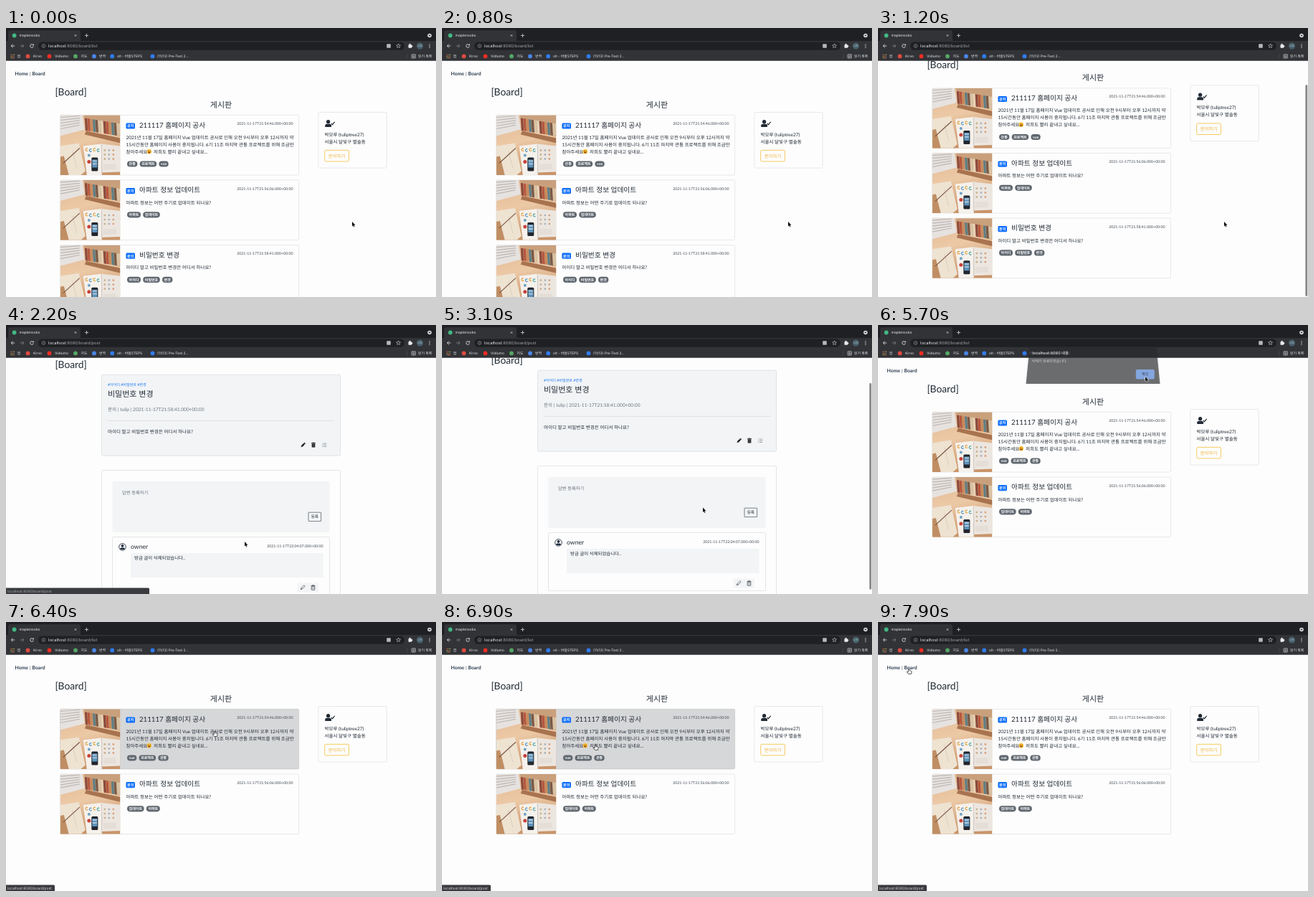
These frames come from a looping animation (600 px wide and 375 px high, 8000 ms). An HTML page with a canvas:

```html
<!DOCTYPE html>
<html lang="ko">
<head>
<meta charset="utf-8">
<title>Board</title>
<style>
html, body { margin: 0; width: 100%; height: 100%; overflow: hidden; background: #fdfdfd; }
canvas { display: block; width: 600px; height: 375px; }
</style>
</head>
<body>
<canvas id="stage"></canvas>
<script>
const W = 600, H = 375, LOOP = 8000, STEP = 100, TOP = 45.7;
const canvas = document.getElementById('stage');
const c = canvas.getContext('2d');
const dpr = window.devicePixelRatio || 1;
canvas.width = W * dpr;
canvas.height = H * dpr;

const CJK = '"Noto Sans CJK KR", "Noto Sans CJK", sans-serif';
const BODY = 'Lato, ' + CJK, UI = 'Inter, ' + CJK;
const INK = '#212a34', NAVY = '#2c3e50', GREY = '#6c757d', PALE = '#f2f4f6', EDGE = '#d3d6d9';
const DATE = '#434b54', LIGHT = '#e8eaed', BAR = '#323337', FRAME = '#1f2023';

// Drawing helpers
function text(s, x, y, size, color = INK, weight = 400, font = BODY, align = 'left') {
  c.font = `${weight} ${size}px ${font}`;
  c.fillStyle = color;
  c.textAlign = align;
  c.fillText(s, x, y + size * 0.36);
  return c.measureText(s).width;
}
function box(x, y, w, h, fill, stroke, r = 0, lw = 0.6) {
  c.beginPath();
  c.roundRect(x, y, w, h, r);
  if (fill) { c.fillStyle = fill; c.fill(); }
  if (stroke) { c.strokeStyle = stroke; c.lineWidth = lw; c.stroke(); }
}
function disc(x, y, r, fill) {
  c.beginPath();
  c.arc(x, y, r, 0, Math.PI * 2);
  c.fillStyle = fill;
  c.fill();
}
function arc(x, y, r, from, to, color, lw) {
  c.beginPath();
  c.arc(x, y, r, from, to);
  c.strokeStyle = color;
  c.lineWidth = lw;
  c.stroke();
}
function trace(pts) {
  c.beginPath();
  for (let i = 0; i < pts.length; i += 2) c.lineTo(pts[i], pts[i + 1]);
}
function line(pts, color, lw = 0.8) {
  trace(pts);
  c.strokeStyle = color;
  c.lineWidth = lw;
  c.stroke();
}
function poly(pts, fill) {
  trace(pts);
  c.closePath();
  c.fillStyle = fill;
  c.fill();
}
function at(x, y, draw) {
  c.save();
  c.translate(x, y);
  draw();
  c.restore();
}

// Eased keyframes: [time, ...values]
function track(t, ...keys) {
  if (t <= keys[0][0]) return keys[0].slice(1);
  for (let i = 1; i < keys.length; i++) {
    const a = keys[i - 1], b = keys[i];
    if (t <= b[0]) {
      const u = (t - a[0]) / (b[0] - a[0]), e = u * u * (3 - 2 * u);
      return a.slice(1).map((v, j) => v + (b[j + 1] - v) * e);
    }
  }
  return keys[keys.length - 1].slice(1);
}

// Icons, centred on the current origin
function pencil(color, outline) {
  c.rotate(Math.PI / 4);
  if (outline) {
    box(-1, -3.6, 2, 5.6, null, color, 0.3, 0.6);
    line([-1, 2, 0, 4, 1, 2], color, 0.6);
  } else {
    box(-1.2, -4, 2.4, 1.4, color, null, 0.4);
    box(-1.2, -2.2, 2.4, 4, color);
    poly([-1.2, 1.8, 1.2, 1.8, 0, 4], color);
  }
}
function trash(color, outline) {
  line([-3, -2.5, 3, -2.5], color, outline ? 0.7 : 1);
  line([-1, -2.7, -1, -3.4, 1, -3.4, 1, -2.7], color, 0.6);
  box(-2.3, -1.7, 4.6, 5, outline ? null : color, outline ? color : null, 0.5, 0.7);
  for (const x of [-0.9, 0.9]) line([x, -0.9, x, 2.4], outline ? color : '#c8ccd0', 0.4);
}
function rows(color) {
  for (const y of [-2.2, 0, 2.2]) {
    line([-3, y, -2, y], color, 0.8);
    line([-1.2, y, 3.2, y], color, 0.8);
  }
}
function person(color) {
  disc(0, -1.5, 2.6, color);
  box(-4.5, 1.6, 9, 4.2, color, null, [3, 3, 0.8, 0.8]);
}
function smiley() {
  disc(0, 0, 3.2, '#f7b92f');
  for (const x of [-1.2, 1.2]) disc(x, -0.8, 0.5, '#6b4218');
  c.beginPath();
  c.arc(0, 0.4, 1.8, 0, Math.PI);
  c.fillStyle = '#7a3b1b';
  c.fill();
}

// Desk picture made of flat shapes, 83.4 px square
const SPINES = ['#8c4a3c', '#d9c3a5', '#5f7f86', '#b5573f', '#e6d3b8', '#7a5a48', '#c98a5c'];
function desk() {
  c.save();
  c.beginPath();
  c.rect(0, 0, 83.4, 83.4);
  c.clip();
  const wood = c.createLinearGradient(0, 0, 20, 84);
  wood.addColorStop(0, '#e3b993');
  wood.addColorStop(0.5, '#ecc9a6');
  wood.addColorStop(1, '#c99469');
  box(0, 0, 84, 84, wood);
  // Laptop
  poly([0, 0, 31, 0, 34, 20, 0, 29], '#e6e2df');
  for (let i = 0; i < 5; i++) line([0, 3 + i * 4, 27, 1 + i * 3.2], '#bdb7b4', 1.2);
  // Row of books
  poly([33, 0, 84, 0, 84, 30, 36, 19], '#c9a07c');
  for (let i = 0; i < 14; i++) {
    const x = 34 + i * 3.7, y = 4 + i * 0.6;
    poly([x, y, x + 3.3, y + 0.5, x + 4.3, y + 18, x + 1, y + 17.4], SPINES[i * 3 % 7]);
  }
  poly([36, 22, 84, 32, 84, 39, 34, 27], '#a8734f');
  // Notebook and pencil
  poly([0, 43, 26, 39, 35, 78, 28, 84, 0, 84], '#eee2d1');
  poly([0, 58, 5, 57, 12, 84, 0, 84], '#c08e63');
  line([17, 50, 23, 74], '#cfc1ad', 0.6);
  line([4, 67, 27, 46], '#7a5540', 1.1);
  // Open book and phone
  poly([32, 43, 57, 40, 58, 84, 37, 84], '#f5f1ec');
  poly([57, 40, 84, 43, 84, 79, 58, 80], '#ece6e0');
  line([57.5, 41, 58, 82], '#c9c2bd', 0.8);
  ['#e39a35', '#4f8fc0', '#e0a33c', '#48a3a0'].forEach((col, i) =>
    arc(37 + i * 5.4, 48 + (i % 2), 1.8, 0.6, 5.4, col, 1.1));
  for (let i = 0; i < 9; i++)
    disc(62 + (i % 3) * 6, 49 + Math.floor(i / 3) * 6, 1.4, ['#c9b28b', '#a9b3ba', '#d6a27e'][i % 3]);
  for (let i = 0; i < 4; i++) line([60, 69 + i * 2, 78, 68.5 + i * 2], '#cfc6bd', 0.5);
  disc(40, 65, 2.5, '#c8413b');
  disc(40, 56, 2, '#6fa3c4');
  box(43.5, 59, 9, 19, '#22262d', null, 1.5);
  box(44.5, 62, 7, 11, '#5d93bd');
  for (let i = 0; i < 6; i++) box(45.2 + (i % 3) * 2.1, 63 + Math.floor(i / 3) * 4, 1.3, 1.8, '#dfe8ee');
  c.restore();
}

// Page content, in page coordinates with no scroll
const CARDS = [
  { kind: '공지', title: '211117 홈페이지 공사', date: '2021-11-17T21:54:46.000+00:00',
    tags: ['관통', '프로젝트', 'vue'],
    body: ['2021년 11월 17일 홈페이지 Vue 업데이트 공사로 인해 오전 9시부터 오후 12시까지 약',
      '15시간동안 홈페이지 사용이 중지됩니다. 6기 11조 마지막 관통 프로젝트를 위해 조금만', '참아주세요'] },
  { kind: '문의', title: '아파트 정보 업데이트', date: '2021-11-17T21:56:06.000+00:00',
    tags: ['아파트', '업데이트'], body: ['아파트 정보는 어떤 주기로 업데이트 되나요?'] },
  { kind: '문의', title: '비밀번호 변경', date: '2021-11-17T21:58:41.000+00:00',
    tags: ['아이디', '비밀번호', '변경'], body: ['아이디 말고 비밀번호 변경은 어디서 하나요?'] }
];
const cardTop = i => 121.4 + i * 90.6;

function card(d, y, hover, flip) {
  box(75.6, y, 333, 83.6, hover ? '#d6d7d9' : '#fdfdfd', hover ? '#bfc1c3' : '#d9dadb', 1.6);
  at(75.8, y + 0.1, desk);
  box(167.4, y + 11, 12.6, 8.2, '#0d6efd', null, 1.6);
  text(d.kind, 173.7, y + 15.1, 5, '#fff', 700, BODY, 'center');
  text(d.title, 186, y + 13.7, 9.7);
  text(d.date, 400.4, y + 11.7, 5.2, DATE, 400, BODY, 'right');
  d.body.forEach((s, i) => text(s, 167.4, y + 31.2 + i * 9.9, 6.5));
  if (d.body.length > 2) {
    at(199.8, y + 50.9, smiley);
    text('저희도 빨리 끝내고 싶네요...', 206, y + 51, 6.5);
  }
  let x = 169;
  const tagY = y + 34.3 + d.body.length * 9.9;
  for (const s of flip ? [...d.tags].reverse() : d.tags) {
    c.font = `700 5px ${BODY}`;
    const w = c.measureText(s).width + 5.2;
    box(x, tagY, w, 8.2, '#5f676f', null, 4.1);
    text(s, x + w / 2, tagY + 4, 5, '#fff', 700, BODY, 'center');
    x += w + 3.2;
  }
}

function header() {
  text('Home', 12.5, 63.7, 6.8, NAVY, 700);
  text('|', 33.6, 63.5, 6, NAVY, 400, BODY, 'center');
  text('Board', 36.5, 63.7, 6.8, NAVY, 700);
  text('[Board]', 68.4, 89, 13.8, INK);
}

function list(cards, mouse, scroll, flip) {
  text('게시판', 300, 106.6, 11, INK, 400, BODY, 'center');
  cards.forEach((d, i) => card(d, cardTop(i), i === hovered(cards, mouse, scroll), flip));
  box(435.8, 117.5, 95.4, 77.6, null, '#d9dadb', 1.6);
  at(449.6, 132.2, () => person(INK));
  line([453.8, 133, 455.4, 134.8, 458.6, 130.8], INK, 1.2);
  text('박모루 (tuliptree27)', 444.5, 148.6, 6.5);
  text('서울시 달빛구 별솔동', 444.5, 158.4, 6.5);
  box(444.7, 170.4, 33.8, 15.6, null, '#f5bd3a', 1.8, 0.8);
  text('문의하기', 461.6, 178.3, 6.5, '#efb43a', 400, BODY, 'center');
}
function hovered(cards, [x, y], scroll) {
  return cards.findIndex((d, i) => x > 76 && x < 408 &&
    y + scroll > cardTop(i) && y + scroll < cardTop(i) + 83.6);
}

function post(showReply) {
  const d = CARDS[2];
  at(0, 34.3, () => {
    box(133.5, 69.2, 333, 113, PALE, EDGE, 1.6);
    text('#아이디 #비밀번호 #변경', 142, 83, 5.1, '#1a76f2');
    text(d.title, 142, 96, 11);
    text('문의 | tulip | ' + d.date, 142, 118, 6.6, GREY);
    line([142, 133.4, 458.5, 133.4], '#d2d5d8', 0.6);
    text(d.body[0], 142, 148.4, 6.5);
    at(414.4, 167.3, () => pencil('#15181b'));
    at(429, 167.3, () => trash('#15181b'));
    at(444, 167.3, () => rows('#8a9096'));
    box(133.5, 202.5, 333, showReply ? 184 : 102, null, EDGE, 1.6);
    box(148.5, 218, 303, 71, PALE);
    text('답변 등록하기', 162, 233.4, 6.3, GREY);
    box(422, 261.2, 17.6, 12.4, null, '#4a5056', 0.5, 0.7);
    text('등록', 430.8, 267.4, 5.6, INK, 400, BODY, 'center');
    if (!showReply) return;
    box(148.5, 295.5, 303, 81, null, EDGE, 1.6);
    arc(162.5, 309.4, 4.8, 0, 7, '#1c2b3d', 0.9);
    disc(162.5, 307.8, 1.9, '#1c2b3d');
    box(159.2, 310.4, 6.6, 2.6, '#1c2b3d', null, [2, 2, 1.2, 1.2]);
    text('owner', 174, 309.2, 8.7);
    text('2021-11-17T22:04:07.000+00:00', 442.4, 308, 5.2, DATE, 400, BODY, 'right');
    box(174, 318, 268.5, 34, PALE);
    text('방금 글이 삭제되었습니다..', 179, 324.8, 6.4);
    box(406.5, 359.5, 29.5, 13, PALE);
    at(414, 366, () => pencil('#343a40', true));
    at(428.5, 366, () => trash('#343a40', true));
  });
}

function deleting(t) {
  const gap = Math.PI / 2 + (t - 4300) / 750 * Math.PI * 2;
  arc(300, 124, 6, gap + Math.PI / 4, gap + Math.PI * 1.75, INK, 1.7);
  text('삭제중...', 300, 145.3, 6.5, INK, 700, BODY, 'center');
}

// Browser window
function browser(url) {
  box(0, 0, W, TOP, BAR);
  box(0, 0, W, 18, FRAME);
  box(3, 3.2, 101, 16, BAR, null, [3, 3, 0, 0]);
  disc(11.6, 10.5, 2.9, '#41b883');
  text('maplenooks', 18.5, 10.5, 5, LIGHT, 400, UI);
  cross(97, 10.5, 1.6, Math.PI / 4);
  cross(112.5, 10.5, 2.6, 0);
  disc(591, 10.5, 2.8, '#d5d7da');
  poly([589.5, 9.8, 592.5, 9.8, 591, 11.8], FRAME);

  line([9.6, 22.6, 7.2, 25, 9.6, 27.4], LIGHT);
  line([7.2, 25, 12.2, 25], LIGHT);
  line([22.4, 22.6, 24.8, 25, 22.4, 27.4], '#85888c');
  line([19.8, 25, 24.8, 25], '#85888c');
  arc(36, 25, 2.3, 0.2, 5.4, LIGHT, 0.8);
  poly([36.4, 24.3, 38.8, 24.3, 38.8, 21.9], LIGHT);
  box(45, 19.4, 511, 11.4, FRAME, null, 5.7);
  arc(52.4, 25, 2.3, 0, 7, '#a6aaae', 0.6);
  line([52.4, 24.6, 52.4, 26.4], '#a6aaae', 0.6);
  line([52.4, 23.5, 52.4, 24.1], '#a6aaae', 0.6);
  const w = text('localhost', 59, 25, 5.75, LIGHT, 400, UI);
  text(url, 59 + w, 25, 5.75, '#a0a4a9', 400, UI);
  box(531.2, 22.2, 5.6, 5.6, '#b4b8bc', null, 0.8);
  const star = [];
  for (let i = 0; i < 11; i++) {
    const a = i * Math.PI / 5 - Math.PI / 2, r = i % 2 ? 1.4 : 3.1;
    star.push(547.6 + r * Math.cos(a), 25 + r * Math.sin(a));
  }
  line(star, '#d5d7da', 0.6);
  box(561.5, 23.2, 4.6, 4.6, LIGHT, null, 0.6);
  disc(563.6, 22.9, 1.1, LIGHT);
  disc(566.3, 25.4, 1.1, LIGHT);
  disc(577.5, 25, 4.5, '#47616d');
  text('나무', 577.5, 25, 3.4, '#d9e2e6', 400, UI, 'center');
  for (const y of [22.8, 25, 27.2]) disc(591, y, 0.65, LIGHT);

  for (let i = 0; i < 9; i++)
    box(6.4 + (i % 3) * 2.1, 36.8 + Math.floor(i / 3) * 2.1, 1.3, 1.3, ['#e0574b', '#d9a03c', '#5b9a68'][(i * 2 + Math.floor(i / 3)) % 3]);
  text('앱', 15.4, 39.4, 4.9, LIGHT, 400, UI);
  const marks = [
    ['Kirvo', 30.5, 38, '#e04a3f'], ['Vidlumo', 60.5, 68, '#f02c23'], ['지도', 97, 104.4, '#54a866'],
    ['번역', 123, 130, '#4a86e8'], ['olt - 바람STEPS', 148.2, 155, '#2f7cf0'],
    ['(11/13) Pre-Test 2...', 204.5, 211, '#2f7cf0']
  ];
  marks.forEach(([s, ix, x, color]) => {
    disc(ix, 39.4, 2.9, color);
    text(s, x, 39.4, 4.9, LIGHT, 400, UI);
  });
  line([559.6, 36, 559.6, 43], '#55575b', 0.5);
  box(566, 36.8, 5.4, 5.2, null, LIGHT, 0.4, 0.6);
  for (const y of [38.2, 39.5, 40.8]) line([567, y, 570.4, y], LIGHT, 0.5);
  text('읽기 목록', 575, 39.4, 4.9, LIGHT, 400, UI);
}
function cross(x, y, r, turn) {
  at(x, y, () => {
    c.rotate(turn);
    line([-r, 0, r, 0], LIGHT, 0.7);
    line([0, -r, 0, r], LIGHT, 0.7);
  });
}

function scrollbar(alpha, scroll, extent) {
  const view = H - TOP, full = view + extent;
  c.globalAlpha = alpha;
  box(596.4, TOP + scroll / full * view, 2.8, view * view / full - 1, '#858585', null, 1.4);
  c.globalAlpha = 1;
}

function status(t) {
  let path = '/board/post', width = 68, ink = '#d5d7da', alpha;
  if (t < 2800) {
    [alpha] = track(t, [1500, 0], [1700, 1], [2300, 1], [2600, 0]);
    [width] = track(t, [1900, 68], [2200, 200]);
    if (t >= 2100) ink = '#a3a7ab';
  } else if (t < 5000) {
    [alpha] = track(t, [3600, 0], [3700, 1], [4100, 1], [4300, 0.27], [4400, 0]);
    path += '/delete';
    width = 84;
  } else {
    [alpha] = track(t, [6200, 0], [6400, 1]);
  }
  if (!alpha) return;
  c.globalAlpha = alpha;
  box(-2, 366.4, width + 2, 10, '#3a3b3e', null, [0, 1.6, 0, 0]);
  text('localhost:8080' + path, 2, 370.8, 4.9, ink, 400, UI);
  c.globalAlpha = 1;
}

function alertSheet(t) {
  const [alpha] = track(t, [4600, 0], [4800, 1], [5600, 1], [5700, 0.66], [5900, 0]);
  if (!alpha) return;
  const k = 1 - alpha;
  c.save();
  c.globalAlpha = alpha;
  c.shadowColor = 'rgba(0,0,0,.1)';
  c.shadowBlur = 4 * dpr;
  poly([206.5 + 15 * k, 28 + 6 * k, 393.5 - 15 * k, 28 + 6 * k, 393.5, 82, 206.5, 82], '#2a2b2e');
  c.shadowColor = 'transparent';
  c.globalAlpha = Math.sqrt(alpha);
  text('localhost:8080 내용:', 214.5 + 2 * k, 39, 5.4, LIGHT, 600, UI);
  text('삭제가 완료되었습니다.', 214.5, 50.6, 5.1, LIGHT, 400, UI);
  box(359.8, 62, 26, 13.4, '#8ab4f8', null, 1.8);
  text('확인', 372.8, 68.6, 5, '#202124', 400, UI, 'center');
  c.restore();
}

function pointer([x, y], hand) {
  c.lineJoin = 'round';
  at(x, y, () => {
    if (hand) {
      c.beginPath();
      c.moveTo(-0.7, 0.3);
      c.quadraticCurveTo(0, -0.6, 0.7, 0.3);
      c.lineTo(0.8, 2.6);
      c.lineTo(3.4, 3.2);
      c.quadraticCurveTo(4.2, 3.6, 4, 4.8);
      c.lineTo(3.3, 7.4);
      c.lineTo(-0.6, 7.4);
      c.lineTo(-2.8, 4.6);
      c.quadraticCurveTo(-2.4, 3.6, -0.8, 4.8);
      c.closePath();
      c.fillStyle = '#fff';
      c.fill();
      c.strokeStyle = '#111';
      c.lineWidth = 0.7;
      c.stroke();
    } else {
      const shape = [0, 0, 0, 6.4, 1.4, 5.2, 2.4, 7.4, 3.4, 7, 2.5, 4.8, 4.4, 4.7];
      line([...shape, 0, 0], '#fff', 1);
      poly(shape, '#0b0b0b');
    }
  });
}

function draw(t) {
  c.setTransform(dpr, 0, 0, dpr, 0, 0);
  c.textBaseline = 'alphabetic';
  c.textRendering = 'geometricPrecision';
  box(0, 0, W, H, '#fdfdfd');

  const mouse = track(t, [1300, 483, 270], [1700, 333, 302], [2800, 333, 302], [3600, 431, 152],
    [4600, 431, 152], [5300, 373, 72], [5800, 373, 72], [6300, 300, 150], [6800, 214, 171],
    [7200, 214, 171], [7800, 43, 65]);
  const isPost = t >= 1900 && t < 3900, isDelete = t >= 3900 && t < 5600, after = t >= 5600;
  const cards = after ? CARDS.slice(0, 2) : CARDS;
  let scroll = 0;
  if (t < 1900) [scroll] = track(t, [900, 0], [1200, 37.5]);
  else if (isPost) [scroll] = track(t, [2900, 34.3], [3300, 46.3]);

  at(0, -scroll, () => {
    header();
    if (isPost) post(t >= 2000);
    else if (isDelete) deleting(t);
    else list(cards, mouse, scroll, after);
  });
  if (t < 1900) scrollbar(track(t, [900, 0], [1000, 1], [1500, 1], [1800, 0])[0], scroll, 37.5);
  else if (isPost) scrollbar(track(t, [2800, 0], [2900, 1], [3600, 1], [3900, 0])[0], scroll, 46.3);

  browser(':8080/board/' + (isPost ? 'post' : isDelete ? 'post/delete' : 'list'));
  status(t);
  alertSheet(t);
  const onCard = !isPost && !isDelete && hovered(cards, mouse, scroll) >= 0;
  const onLink = after && mouse[0] < 56 && mouse[1] < 69;
  const onTrash = t >= 3600 && t < 3900;
  pointer(mouse, onCard || onLink || onTrash);
}

const start = performance.now();
function frame() {
  const t = (performance.now() - start) % LOOP;
  draw(Math.floor(t / STEP) * STEP);
  requestAnimationFrame(frame);
}
frame();
</script>
</body>
</html>
```
